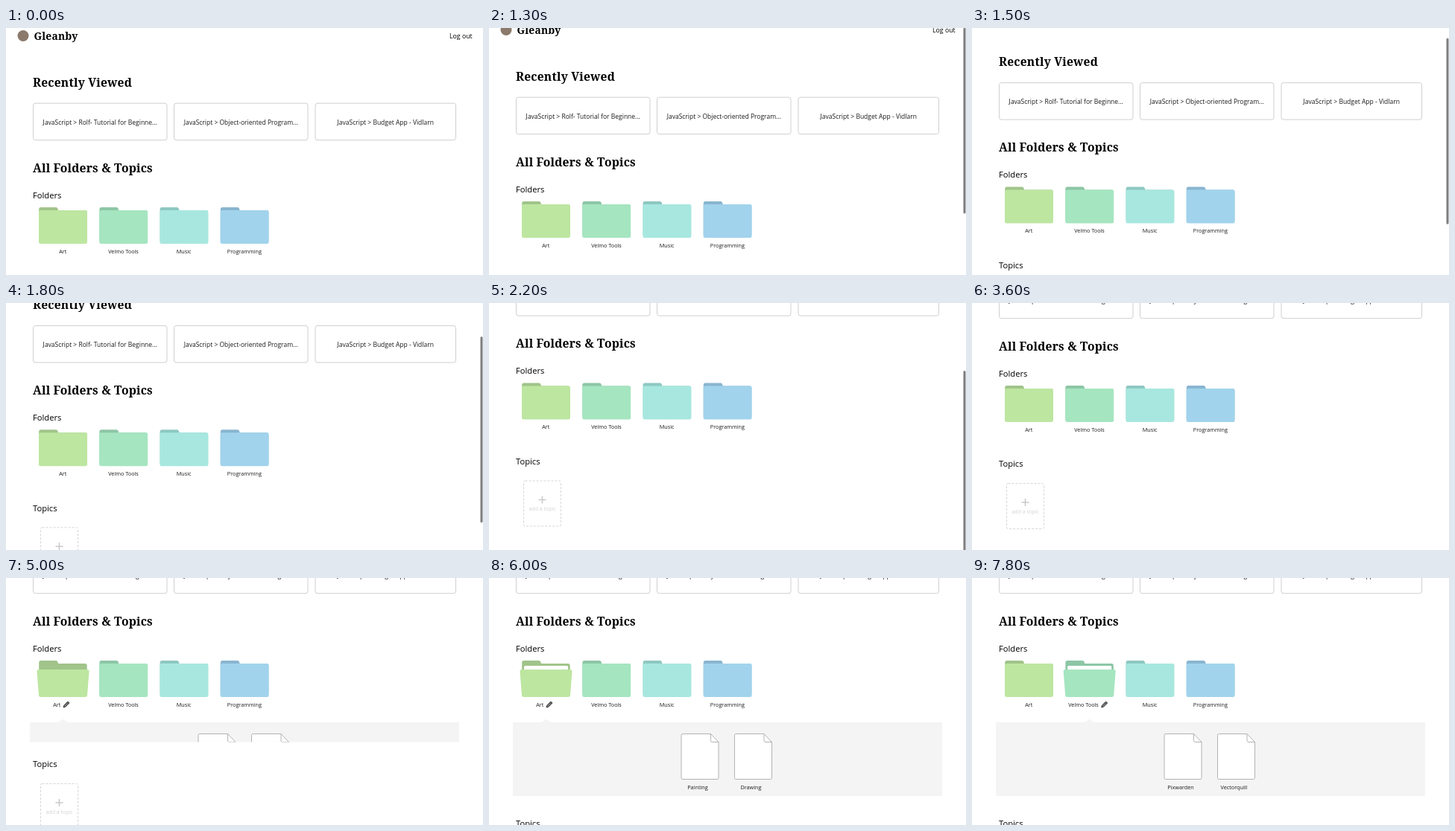
Write an HTML page that moves like this. It is 640 px wide and 332 px high and loops after 8 s.

```html
<!DOCTYPE html>
<html lang="en">
<head>
<meta charset="utf-8">
<title>Folders and topics</title>
<style>
@property --scroll { syntax: "<number>"; inherits: true; initial-value: 0; }
@property --art { syntax: "<number>"; inherits: true; initial-value: 0; }
@property --tools { syntax: "<number>"; inherits: true; initial-value: 0; }
@property --hover { syntax: "<number>"; inherits: true; initial-value: 0; }

html, body { margin: 0; width: 100%; height: 100%; overflow: hidden; background: #fff; }
svg {
  display: block; width: 640px; height: 332px;
  animation: scroll 8s linear infinite, art 8s infinite, tools 8s infinite;
}
text { font: 500 7.25px "Open Sans", "Noto Sans", sans-serif; fill: #1a1a1a; }
.mid { text-anchor: middle; }
.title { font: 700 15.6px "Noto Serif", serif; letter-spacing: .2px; fill: #000; }
.brand { font-size: 13.8px; }
.sub { font-size: 11.2px; fill: #000; }
.link { font-size: 8.75px; fill: #000; }
.card text { font-size: 8.5px; }
.card rect { fill: #fff; stroke: #cfcfcf; }

.page { transform: translateY(calc(var(--scroll) * -1px)); }
.topics { transform: translateY(calc((var(--art) + var(--tools)) * 113.5px)); }
.thumb {
  fill: #7d7d7d;
  transform: translateY(calc(var(--scroll) * .73px - 6.5px));
  animation: thumb 8s linear infinite;
}

.front { stroke-width: 5; stroke-linejoin: round; d: path("M46.5 247.5L106.5 247.5L106.5 287.5L46.5 287.5Z"); }
.paper { fill: #fff; transform: translateY(calc((1 - var(--open)) * 8px)); }
.label { transform: translateX(calc(var(--hover) * -8px)); }
.pencil { fill: #777; stroke: #333; stroke-width: .9; stroke-linejoin: round; opacity: var(--hover); }
.art { --open: var(--art); animation: artHover 8s step-end infinite; }
.tools { --open: var(--tools); animation: toolsHover 8s step-end infinite; }
.art .front { animation: artFront 8s infinite; }
.tools .front { animation: toolsFront 8s infinite; }

.panel { clip-path: inset(0 0 calc((1 - var(--open)) * 100%) 0); }
.panel > path { fill: #f4f4f4; }
.panel > .doc { fill: #fff; stroke: #b2b2b2; stroke-linejoin: round; }
.add { fill: none; stroke: #d6d6d6; stroke-dasharray: 3 2; }
.plus { stroke: #cacaca; stroke-width: 1.6; }
.faint { fill: #d2d2d2; font-size: 7px; }

@keyframes scroll {
  0%, 15% { --scroll: 0; }
  16.25% { --scroll: 8; animation-timing-function: cubic-bezier(.4, .2, .8, .8); }
  22.5% { --scroll: 70.5; animation-timing-function: cubic-bezier(.3, .4, .6, 1); }
  27.5% { --scroll: 133.5; }
  30% { --scroll: 134; animation-timing-function: ease-in-out; }
  37.5%, 100% { --scroll: 130; }
}
@keyframes thumb {
  0%, 16.24% { opacity: 0; }
  16.25%, 40% { opacity: 1; }
  45%, 100% { opacity: 0; }
}
@keyframes art {
  0%, 61.25% { --art: 0; }
  67.5%, 80% { --art: 1; }
  86.25%, 100% { --art: 0; }
}
@keyframes tools {
  0%, 91.25% { --tools: 0; }
  97.5%, 100% { --tools: 1; }
}
@keyframes artHover {
  0% { --hover: 0; }
  51.25% { --hover: 1; }
  85%, 100% { --hover: 0; }
}
@keyframes toolsHover {
  0% { --hover: 0; }
  86.25%, 100% { --hover: 1; }
}
@keyframes artFront {
  0%, 50% { d: path("M46.5 247.5L106.5 247.5L106.5 287.5L46.5 287.5Z"); }
  53.75%, 83.75% { d: path("M44 255.5L109 255.5L106.5 287.5L46.5 287.5Z"); }
  87.5%, 100% { d: path("M46.5 247.5L106.5 247.5L106.5 287.5L46.5 287.5Z"); }
}
@keyframes toolsFront {
  0%, 85% { d: path("M46.5 247.5L106.5 247.5L106.5 287.5L46.5 287.5Z"); }
  87.5%, 100% { d: path("M44 255.5L109 255.5L106.5 287.5L46.5 287.5Z"); }
}
</style>
</head>
<body>
<svg viewBox="0 0 640 332">
  <g class="page">
    <circle cx="23" cy="10.5" r="7.5" fill="#8b7a6b"/>
    <text class="title brand" x="37.5" y="15.7">Gleanby</text>
    <text class="link" x="595" y="14">Log out</text>
    <text class="title" x="36" y="79">Recently Viewed</text>
    <g id="cards"></g>
    <text class="title" x="36" y="194">All Folders &amp; Topics</text>
    <text class="sub" x="36" y="228.6">Folders</text>
    <g id="folders"></g>
    <g id="panels"></g>
    <g class="topics">
      <text class="sub" x="36" y="350.4">Topics</text>
      <rect class="add" x="46.5" y="372.5" width="50" height="61" rx="2"/>
      <path class="plus" d="M66.5 398H76.5M71.5 393V403"/>
      <text class="mid faint" x="71.5" y="413">add a topic</text>
    </g>
  </g>
  <rect class="thumb" x="636.5" y="0" width="3" height="250" rx="1.5"/>
</svg>
<script>
const fill = (id, items, draw) => {
  document.getElementById(id).innerHTML = items.map(draw).join("");
};
const STEP = 81.2;

const cards = [
  [36.5, 179.5, "Rolf- Tutorial for Beginne..."],
  [225.5, 179.5, "Object-oriented Program..."],
  [415, 188.5, "Budget App - Vidlarn"]
];
fill("cards", cards, ([x, w, name]) => `
  <g class="card">
    <rect x="${x}" y="101.2" width="${w}" height="49.5" rx="3"/>
    <text class="mid" x="${x + w / 2}" y="129.6">JavaScript &gt; ${name}</text>
  </g>`);

// name, front colour, back colour, class, pencil x
const folders = [
  ["Art", "#bde6a1", "#a1c48a", "art", 89],
  ["Velmo Tools", "#a5e5c0", "#8dc6a5", "tools", 104.5],
  ["Music", "#a7e7df", "#8ec8c2", ""],
  ["Programming", "#a1d3ec", "#89b5d0", ""]
];
fill("folders", folders, ([name, front, back, cls, px], i) => `
  <g transform="translate(${i * STEP})"><g class="${cls}">
    <path fill="${back}" d="M44.2 286V243.500Q44.200 241 46.700 241H67Q69.500 241 70 245H106.500Q108.700 245 108.700 247.500V286Z"/>
    ${cls && '<rect class="paper" x="47" y="248" width="59" height="30" rx="1.500"/>'}
    <path class="front" fill="${front}" stroke="${front}"/>
    <g class="label">
      <text class="mid" x="76.3" y="303">${name}</text>
      ${cls && `<path class="pencil" transform="translate(${px} 300)"
        d="M-4 4L-3.200 1L2 -4L4 -2L-1.200 3.200ZM.5 -2.500L2.500 -.5"/>`}
    </g>
  </g></g>`);

const doc = (x, name) => `
  <path class="doc" d="M${x + 39.5} 339.500H${x + 2}Q${x} 339.500 ${x} 341.500V398.500Q${x} 400.500 ${x + 2} 400.500
    H${x + 48}Q${x + 50} 400.500 ${x + 50} 398.500V350.500ZV348.500Q${x + 39.5} 350.500 ${x + 41.5} 350.500H${x + 50}"/>
  <text class="mid" x="${x + 22}" y="414">${name}</text>`;
const panels = [
  ["art", "Painting", "Drawing"],
  ["tools", "Pixwarden", "Vectorquill"]
];
fill("panels", panels, ([open, a, b], i) => `
  <g class="panel" style="--open:var(--${open})">
    <path d="M32 324H${70.5 + i * STEP}l6 -4.500l6 4.500H608V423H32Z"/>
    ${doc(258, a)}${doc(329.5, b)}
  </g>`);
</script>
</body>
</html>
```
